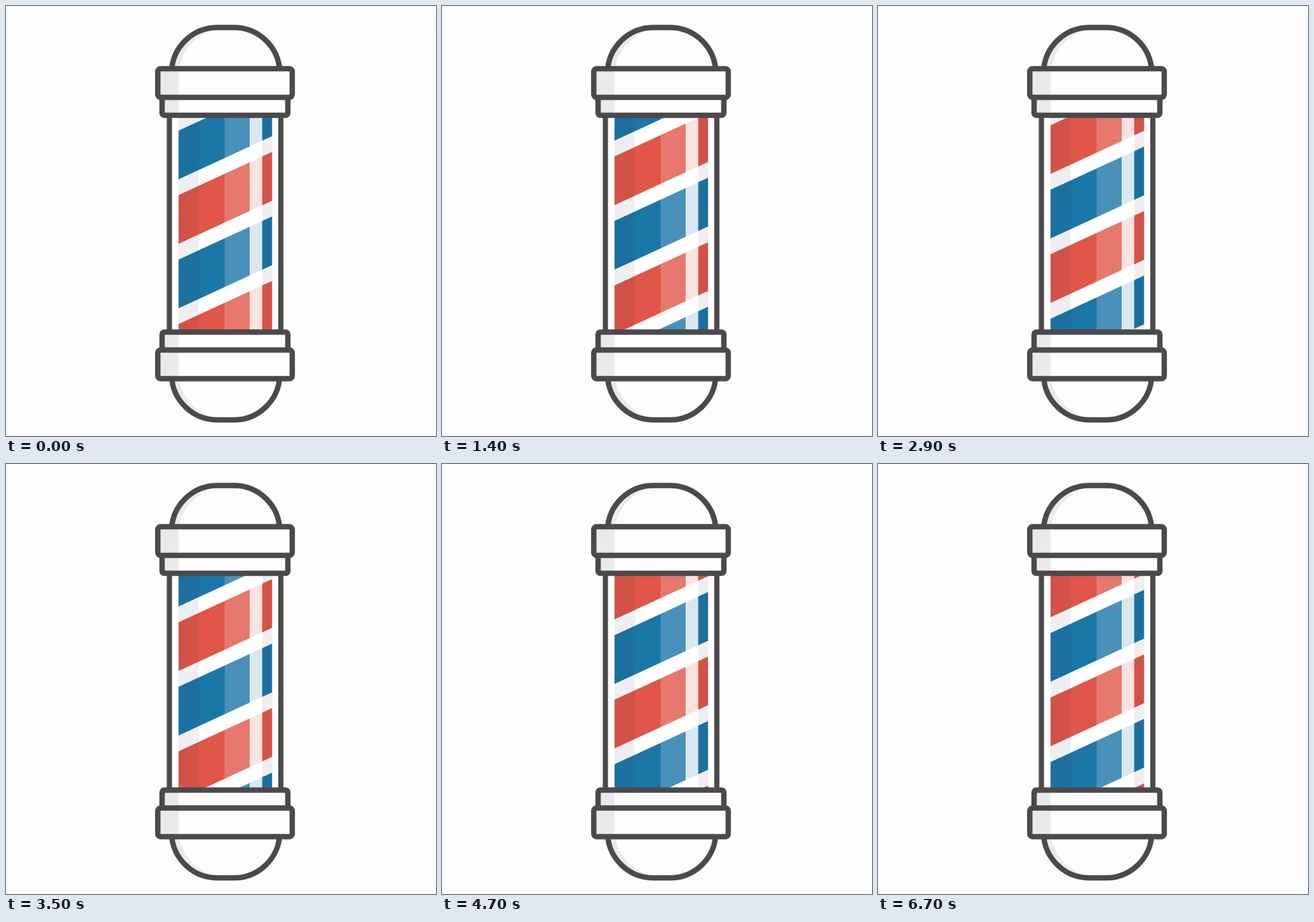
An HTML page for the animation above (6800 ms loop, 600 by 600 pixels).

```html
<!DOCTYPE html>
<html lang="en">
<head>
<meta charset="utf-8">
<title>Barber pole</title>
<style>
  html, body { margin: 0; width: 100%; height: 100%; overflow: hidden; background: #fefdfe; }
  svg { display: block; width: 100vw; height: 100vh; }
  .line { fill: none; stroke: #4b494c; stroke-width: 7.5; }
  .body { fill: #fdfcfe; }
  .shade { fill: #eae9ec; }
  .dim { fill: #281e3c; opacity: .07; }
</style>
</head>
<body>
<svg viewBox="0 0 600 600">
  <defs>
    <clipPath id="glass"><rect x="240.5" y="154" width="131" height="299"/></clipPath>
    <g id="cap">
      <path class="body" d="M231 92A64 64 0 0 1 295 30H318A64 64 0 0 1 382 92Z"/>
      <path class="shade" d="M231 92A64 64 0 0 1 295 30Q244 50 241 92Z"/>
      <path class="line" d="M231 92A64 64 0 0 1 295 30H318A64 64 0 0 1 382 92"/>
      <rect class="body" x="218" y="125" width="175" height="27.5"/>
      <rect class="shade" x="218" y="125" width="22.5" height="27.5"/>
      <rect class="line" x="217.8" y="124" width="175.5" height="28.5" rx="3"/>
      <rect class="body" x="212" y="87.5" width="187.5" height="40" rx="4"/>
      <rect class="shade" x="212" y="87.5" width="28.5" height="40"/>
      <rect class="line" x="211.8" y="87.6" width="187.6" height="40" rx="4"/>
    </g>
  </defs>

  <rect x="228" y="150" width="156" height="305" fill="#fff"/>
  <g clip-path="url(#glass)">
    <g id="stripes"></g>
    <rect class="dim" x="240" y="150" width="29" height="305"/>
    <rect class="dim" x="357.5" y="150" width="15" height="305"/>
    <rect x="305" y="150" width="35" height="305" fill="#fff" opacity=".2"/>
    <rect x="340" y="150" width="17.5" height="305" fill="#fff" opacity=".83"/>
  </g>
  <path class="line" style="stroke-width:7.2" d="M228 150V457M383.5 150V457"/>
  <use href="#cap"/>
  <use href="#cap" transform="translate(0 607.5) scale(1 -1)"/>
</svg>
<script>
const LOOP = 6800, STEP = 100;
const PITCH = 90, BAND = 68, RISE = 60.5;
const LEFT = 240.5, RIGHT = 371.5;
// [time in ms, height of a blue band's upper left corner]
const path = [[0, 174], [1400, 300], [2300, 382], [3500, 491], [4700, 599], [5800, 698], [6700, 776]];

const stripes = document.getElementById("stripes");
for (let i = -2; i < 6; i++) {
  const y = i * PITCH;
  const band = document.createElementNS("http://www.w3.org/2000/svg", "path");
  band.setAttribute("d", `M${LEFT} ${y}L${RIGHT} ${y - RISE}v${BAND}L${LEFT} ${y + BAND}Z`);
  band.setAttribute("fill", i % 2 ? "#e05648" : "#1b76a8");
  stripes.append(band);
}

function heightAt(t) {
  let i = 1;
  while (i < path.length - 1 && t > path[i][0]) i++;
  const [t0, y0] = path[i - 1], [t1, y1] = path[i];
  return y0 + (y1 - y0) * (t - t0) / (t1 - t0);
}

function draw(now) {
  const t = Math.floor((now % LOOP) / STEP) * STEP;
  const y = heightAt(t) % (2 * PITCH);
  stripes.setAttribute("transform", `translate(0 ${y.toFixed(2)})`);
}

let start;
function tick(now) {
  start ??= now;
  draw(now - start);
  requestAnimationFrame(tick);
}
draw(0);
requestAnimationFrame(tick);
</script>
</body>
</html>
```
